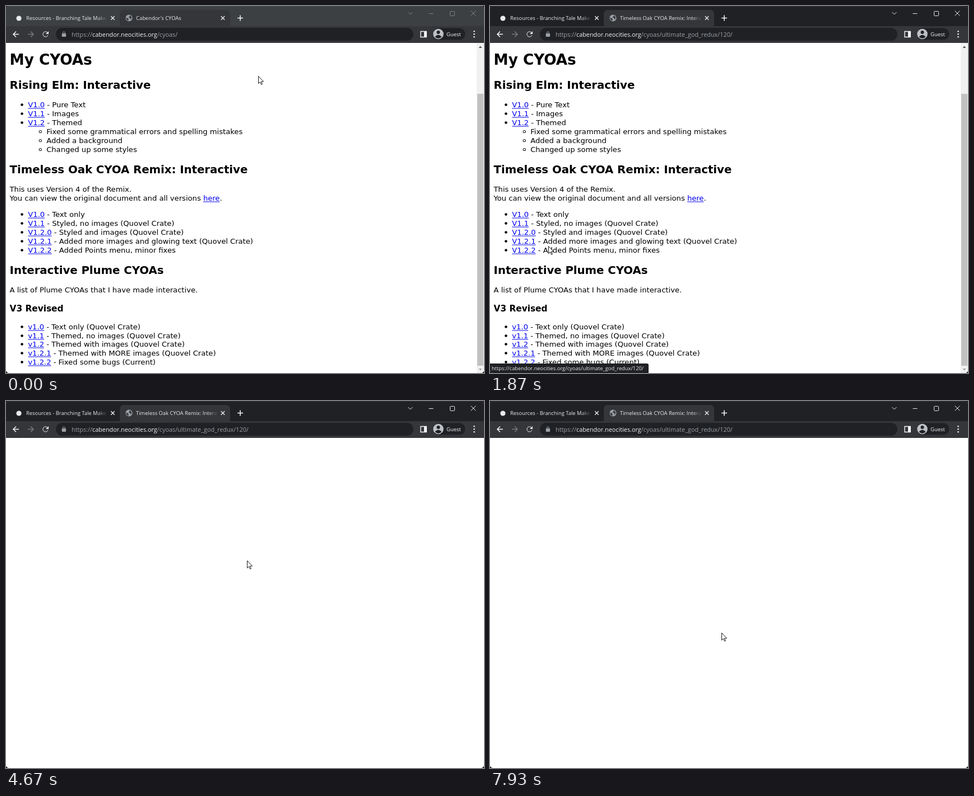
An HTML page with a canvas for the animation above (8000 ms loop, 853 by 656 pixels).

```html
<!DOCTYPE html>
<html lang="en">
<head>
<meta charset="utf-8">
<title>Browser window</title>
<style>
html, body { margin: 0; width: 100%; height: 100%; overflow: hidden; background: #000; }
canvas { display: block; }
</style>
</head>
<body>
<canvas id="stage" width="853" height="656"></canvas>
<script>
const W = 853, H = 656, LOOP = 8000;
const ctx = document.getElementById('stage').getContext('2d');
const UI = '"Open Sans", "Noto Sans", sans-serif';
const PAGE = '"DejaVu Sans", Verdana, sans-serif';
const EM = 13.12, LEFT = EM / 2, INDENT = EM * 3, NESTED = EM * 5.5, LEAD = 15.86;
const LIT = '#f1f3f4', DIM = '#9aa0a6', BAR = '#35363a', DARK = '#202124';
const HOST = 'cabendor.neocities.org', PATH = '/cyoas/', SUB = 'ultimate_god_redux/120/';

// Moments at which the window changes state
const FOCUS = 1460, COMMIT = 1660, BLANK = 2060, CIRCLING = 3330;

// Straight pointer moves: time, x, y
const MOVES = [
  [70, 450, 125], [870, 145, 437], [930, 145, 437], [1000, 94, 437],
  [1330, 69, 441], [1530, 69, 441], [1870, 104, 429], [2200, 326, 311],
  [2400, 354, 278], [2670, 354, 278], [3070, 373, 283]
];

// Circling pointer: time, point passed, radii, turns made
const CIRCLES = [
  [3330, 373, 283, 95, 64, -0.35],
  [4670, 430, 285, 95, 60, 1.84],
  [5350, 531, 320, 140, 96, 3],
  [6400, 422, 521, 150, 200, 4.2],
  [7200, 131, 363, 256, 163, 5.5],
  [7930, 413, 414, 175, 150, 6.43]
].map(([t, x, y, rx, ry, turn]) => {
  const a = turn * Math.PI * 2;
  return [t, x - rx * Math.cos(a), y - ry * Math.sin(a), rx, ry, a];
});

function sample(keys, t, ease) {
  const i = keys.findIndex(k => k[0] > t);
  if (i < 0) return keys[keys.length - 1];
  if (i === 0) return keys[0];
  const a = keys[i - 1], b = keys[i];
  const u = ease((t - a[0]) / (b[0] - a[0]));
  return a.map((v, k) => v + (b[k] - v) * u);
}

function pointer(t) {
  if (t < CIRCLING) return sample(MOVES, t, u => (u + u * u * (3 - 2 * u)) / 2).slice(1);
  const [, cx, cy, rx, ry, a] = sample(CIRCLES, t, u => u);
  return [cx + rx * Math.cos(a), cy + ry * Math.sin(a)];
}

function text(s, x, y, font, fill) {
  ctx.font = font;
  ctx.fillStyle = fill;
  ctx.fillText(s, x, y);
  return x + ctx.measureText(s).width;
}

function box(x, y, w, h, fill, r = 0) {
  ctx.fillStyle = fill;
  ctx.beginPath();
  ctx.roundRect(x, y, w, h, r);
  ctx.fill();
}

function disc(x, y, r, fill) {
  ctx.fillStyle = fill;
  ctx.beginPath();
  ctx.arc(x, y, r, 0, Math.PI * 2);
  ctx.fill();
}

function draw(d, stroke, width = 1, fill) {
  const p = new Path2D(d);
  if (fill) { ctx.fillStyle = fill; ctx.fill(p); }
  if (stroke) { ctx.strokeStyle = stroke; ctx.lineWidth = width; ctx.stroke(p); }
}

function at(x, y, fn) {
  ctx.save();
  ctx.translate(x, y);
  fn();
  ctx.restore();
}

function cross(x, y, r, color, width) {
  at(x, y, () => draw(`M${-r} ${-r}L${r} ${r}M${-r} ${r}L${r} ${-r}`, color, width));
}

function arrowIcon(x, dir, color) {
  at(x, 50.5, () => {
    ctx.scale(dir, 1);
    draw('M-5 0H5M0 -5L5 0L0 5', color, 1.5);
  });
}

function tabTitle(s, x, end) {
  const fade = ctx.createLinearGradient(end - 18, 0, end, 0);
  fade.addColorStop(0, '#e8eaed');
  fade.addColorStop(1, '#e8eaed00');
  text(s, x, 25, '9.4px ' + UI, fade);
}

function globe(x, y) {
  disc(x, y, 6, DIM);
  at(x, y, () => draw('M-5 -1L-1 1V5Q-5 4 -5 -1ZM1 -5V-3L-1 -1L2 0L3 3Q7 -2 1 -5Z', null, 0, BAR));
}

function tabs(active, title) {
  const tone = active ? '#e8eaed' : '#808386';
  box(0, 0, W, 36, active ? DARK : '#3c4043');
  box(0, 0, W, 1, active ? '#303135' : '#45494c');
  box(203, 7, 197, 29, BAR, [7, 7, 0, 0]);
  disc(23, 22, 4.6, '#e8eaed');
  tabTitle('Resources - Branching Tale Maker', 36, 180);
  globe(219.5, 21.5);
  tabTitle(title, 232, 378);
  [190.5, 387].forEach(x => cross(x, 21.5, 3.2, '#e8eaed', 1.4));
  draw('M413 21.5h10m-5 -5v10', LIT, 1.6);
  draw('M717.5 11l4 4l4 -4M754.5 13.5h8', tone);
  ctx.beginPath();
  ctx.roundRect(792.5, 9.5, 8, 8, 1);
  ctx.stroke();
  cross(834, 13, 4.4, tone, 1);
}

function toolbar(path) {
  box(0, 36, W, 30, BAR);
  arrowIcon(18, -1, LIT);
  arrowIcon(44, 1, '#75777b');
  ctx.strokeStyle = LIT;
  ctx.beginPath();
  ctx.arc(70.5, 50.5, 4.6, 0.35, 5.45);
  ctx.stroke();
  draw('M76 45v5h-5Z', null, 0, LIT);

  box(89, 39, 638, 23, DARK, 11.5);
  box(99.7, 49, 7.4, 6, DIM, 1);
  draw('M101.3 49.5V48a2 2 0 0 1 4 0v2', DIM);
  const font = '10.85px ' + UI;
  let x = text('https://', 117, 54.5, font, DIM);
  x = text(HOST, x, 54.5, font, LIT);
  text(path, x, 54.5, font, DIM);

  draw('M740 45.5h10v10h-10Z', LIT, 1.4);
  box(746, 45, 5, 11, LIT);
  box(761.5, 39.5, 58, 21, DARK, 10.5);
  disc(771.5, 50, 9.3, '#bdc1c6');
  disc(771.5, 47, 3, DARK);
  draw('M765.5 55q6 -7 12 0q-6 6 -12 0', null, 0, DARK);
  text('Guest', 786, 53.5, '9.5px ' + UI, LIT);
  [-5, 0, 5].forEach(d => disc(835.5, 50.2 + d, 1.3, LIT));
}

function heading(s, y, size) {
  text(s, LEFT, y, `bold ${EM * size}px ${PAGE}`, '#000');
}

function plain(s, x, y) {
  return text(s, x, y, `${EM}px ${PAGE}`, '#000');
}

function link(s, x, y) {
  const end = text(s, x, y, `${EM}px ${PAGE}`, '#0000ee');
  box(x, y + 1.5, end - x, 1, '#0000ee');
  return end;
}

// Lines of the form "version - note"; a line without a version is nested
function list(top, lines) {
  lines.forEach((line, i) => {
    const y = Math.round(top + i * LEAD);
    const [ver, note] = line.split(' - ');
    if (note) {
      disc(28.5, y - 4.5, 2.3, '#000');
      plain(' - ' + note, link(ver, INDENT, y), y);
    } else {
      disc(61.3, y - 4.5, 2.6, '#000');
      disc(61.3, y - 4.5, 1.7, '#fff');
      plain(line, NESTED, y);
    }
  });
}

function page() {
  heading('My CYOAs', 105, 2);
  heading('Rising Elm: Interactive', 148, 1.5);
  list(181.3, [
    'V1.0 - Pure Text',
    'V1.1 - Images',
    'V1.2 - Themed',
    'Fixed some grammatical errors and spelling mistakes',
    'Added a background',
    'Changed up some styles'
  ]);

  heading('Timeless Oak CYOA Remix: Interactive', 299, 1.5);
  plain('This uses Version 4 of the Remix.', LEFT, 332);
  const x = plain('You can view the original document and all versions ', LEFT, 348);
  plain('.', link('here', x, 348), 348);
  list(377.4, [
    'V1.0 - Text only',
    'V1.1 - Styled, no images (Quovel Crate)',
    'V1.2.0 - Styled and images (Quovel Crate)',
    'V1.2.1 - Added more images and glowing text (Quovel Crate)',
    'V1.2.2 - Added Points menu, minor fixes'
  ]);

  heading('Interactive Plume CYOAs', 479, 1.5);
  plain('A list of Plume CYOAs that I have made interactive.', LEFT, 512);
  heading('V3 Revised', 546, 1.17);
  list(577.7, [
    'v1.0 - Text only (Quovel Crate)',
    'v1.1 - Themed, no images (Quovel Crate)',
    'v1.2 - Themed with images (Quovel Crate)',
    'v1.2.1 - Themed with MORE images (Quovel Crate)',
    'v1.2.2 - Fixed some bugs (Current)'
  ]);

  box(840, 66, 13, 590, '#f1f1f1');
  box(841, 157, 11, 486, '#c1c1c1');
  draw('M843.5 75l3 -3.5l3 3.5Z', null, 0, '#505050');
  draw('M843.5 648l3 3.5l3 -3.5Z', null, 0, '#a3a3a3');
}

function status() {
  box(0, 639, 283, 17, DARK, [0, 3, 0, 0]);
  text('https://' + HOST + PATH + SUB, 3, 651, '9.32px ' + UI, '#e8eaed');
}

const ARROW = 'M.5 .5V13.6L3.5 10.8L5.5 15.4L7.4 14.6L5.4 10.1H9.5Z';
const HAND = 'M0 10V2q1 -3 2 0V6L7 7q2 0 2 2V12L7 16H0L-4 10q0 -3 4 0';
const BEAM = 'M-3 -6.5H3M0 -6.5V6.5M-3 6.5H3';

function cursor(t) {
  const [x, y] = pointer(t);
  at(x, y, () => {
    if (t >= 800 && t < 1200) draw(BEAM, '#000');
    else if (t >= 1200 && t < 1730) draw(HAND, '#000', 0.9, '#fff');
    else draw(ARROW, '#000', 0.9, '#fff');
  });
}

function render(now) {
  const step = Math.floor((now % LOOP + 4) * 0.015) % 120;
  const t = Math.round(step * 20 / 3) * 10;
  const active = t >= FOCUS, opened = t >= COMMIT, blank = t >= BLANK;

  ctx.fillStyle = '#000';
  ctx.fillRect(0, 0, W, H);
  ctx.save();
  ctx.beginPath();
  ctx.roundRect(0, 0, W, H, 5);
  ctx.clip();
  box(0, 0, W, H, '#fff');
  if (!blank) page();
  if (active && !blank) status();
  tabs(active, opened ? 'Timeless Oak CYOA Remix: Interactive' : "Cabendor's CYOAs");
  toolbar(PATH + (opened ? SUB : ''));
  cursor(t);
  ctx.restore();
}

const start = performance.now();
function tick() {
  render(performance.now() - start);
  requestAnimationFrame(tick);
}
tick();
</script>
</body>
</html>
```
